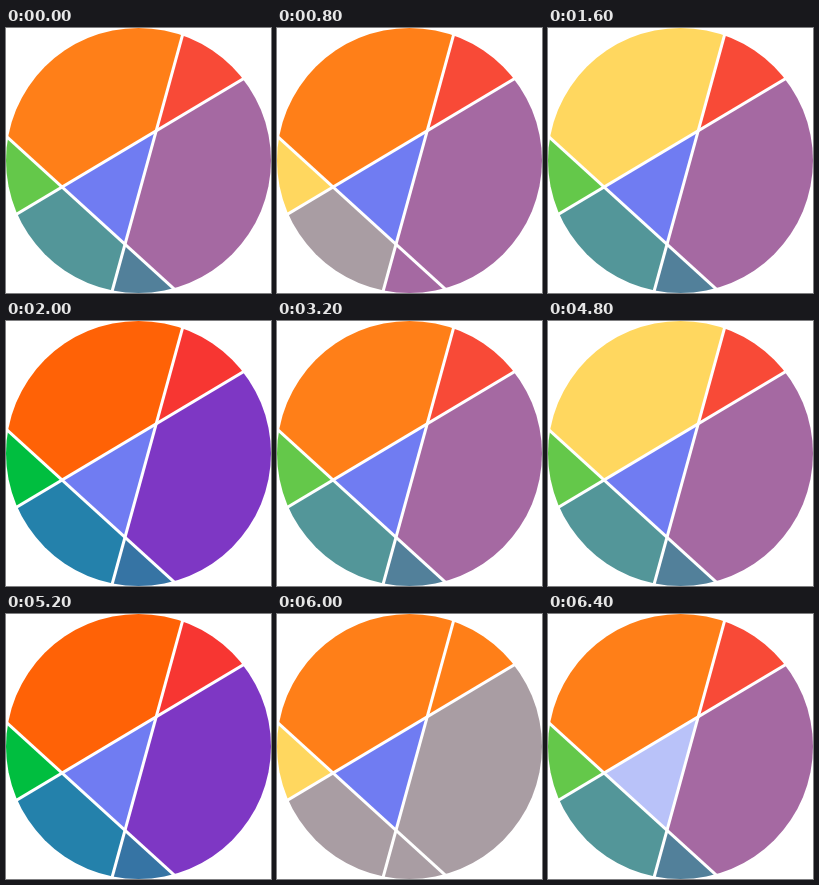
These frames come from a looping animation (265 px wide and 265 px high, 6.8 s). An HTML page with a canvas:

```html
<!DOCTYPE html>
<html lang="en">
<head>
<meta charset="utf-8">
<title>Seven regions</title>
<style>
  html, body { margin: 0; width: 100%; height: 100%; overflow: hidden; background: #fff; }
  canvas { display: block; width: 265px; height: 265px; }
</style>
</head>
<body>
<canvas id="stage" width="265" height="265"></canvas>
<script>
const ctx = document.getElementById('stage').getContext('2d');
const SIZE = 265, STEP = 400, STEPS = 17;

// Corners of the central triangle
const a = [150.2, 102.8], b = [56, 159], c = [119, 216.3];

// Point far beyond q on the ray from p
const beyond = (p, q) => q.map((v, i) => v + 5 * (v - p[i]));

const regions = {
  orange: [a, beyond(c, a), beyond(c, b), b],
  red: [a, beyond(c, a), beyond(b, a)],
  purple: [a, beyond(b, a), beyond(b, c), c],
  green: [b, beyond(c, b), beyond(a, b)],
  teal: [b, beyond(a, b), beyond(a, c), c],
  slate: [c, beyond(a, c), beyond(b, c)],
  center: [a, b, c]
};

const base = {
  orange: '#ff7f18', red: '#f84a37', purple: '#a569a2', green: '#64c84a',
  teal: '#539699', slate: '#52809a', center: '#707cf2'
};
const YELLOW = '#ffd75f', GREY = '#a99da3';
const vivid = {
  orange: '#ff6206', red: '#f73632', purple: '#7e37c4',
  green: '#00be3f', teal: '#2481ab', slate: '#3674a4'
};

// Colours that differ from the base mix at each step of the cycle
const cycle = [
  {},
  { purple: base.red, teal: base.green, slate: base.purple },
  { green: YELLOW, teal: GREY, slate: base.purple },
  { red: base.orange, purple: GREY, slate: base.teal },
  { orange: YELLOW },
  vivid,
  { ...vivid, green: '#ffcf45', teal: '#8f86b8', slate: vivid.purple },
  { red: base.orange, purple: GREY, green: YELLOW, teal: GREY, slate: GREY }
];

function trace(points) {
  ctx.beginPath();
  points.forEach(p => ctx.lineTo(...p));
}

function draw(step) {
  const colors = { ...base, ...cycle[step % cycle.length] };
  if (step === STEPS - 1) colors.center = '#b9c2f9';

  ctx.fillStyle = '#fff';
  ctx.fillRect(0, 0, SIZE, SIZE);
  ctx.save();
  ctx.beginPath();
  ctx.arc(SIZE / 2, SIZE / 2, SIZE / 2, 0, 2 * Math.PI);
  ctx.clip();
  for (const name in regions) {
    trace(regions[name]);
    ctx.fillStyle = colors[name];
    ctx.fill();
  }
  ctx.restore();

  ctx.strokeStyle = '#fff';
  ctx.lineWidth = 3;
  for (const [p, q] of [[a, b], [b, c], [c, a]]) {
    trace([beyond(p, q), beyond(q, p)]);
    ctx.stroke();
  }
}

const start = performance.now();
function tick() {
  draw(Math.floor((performance.now() - start) / STEP) % STEPS);
  requestAnimationFrame(tick);
}
tick();
</script>
</body>
</html>
```
